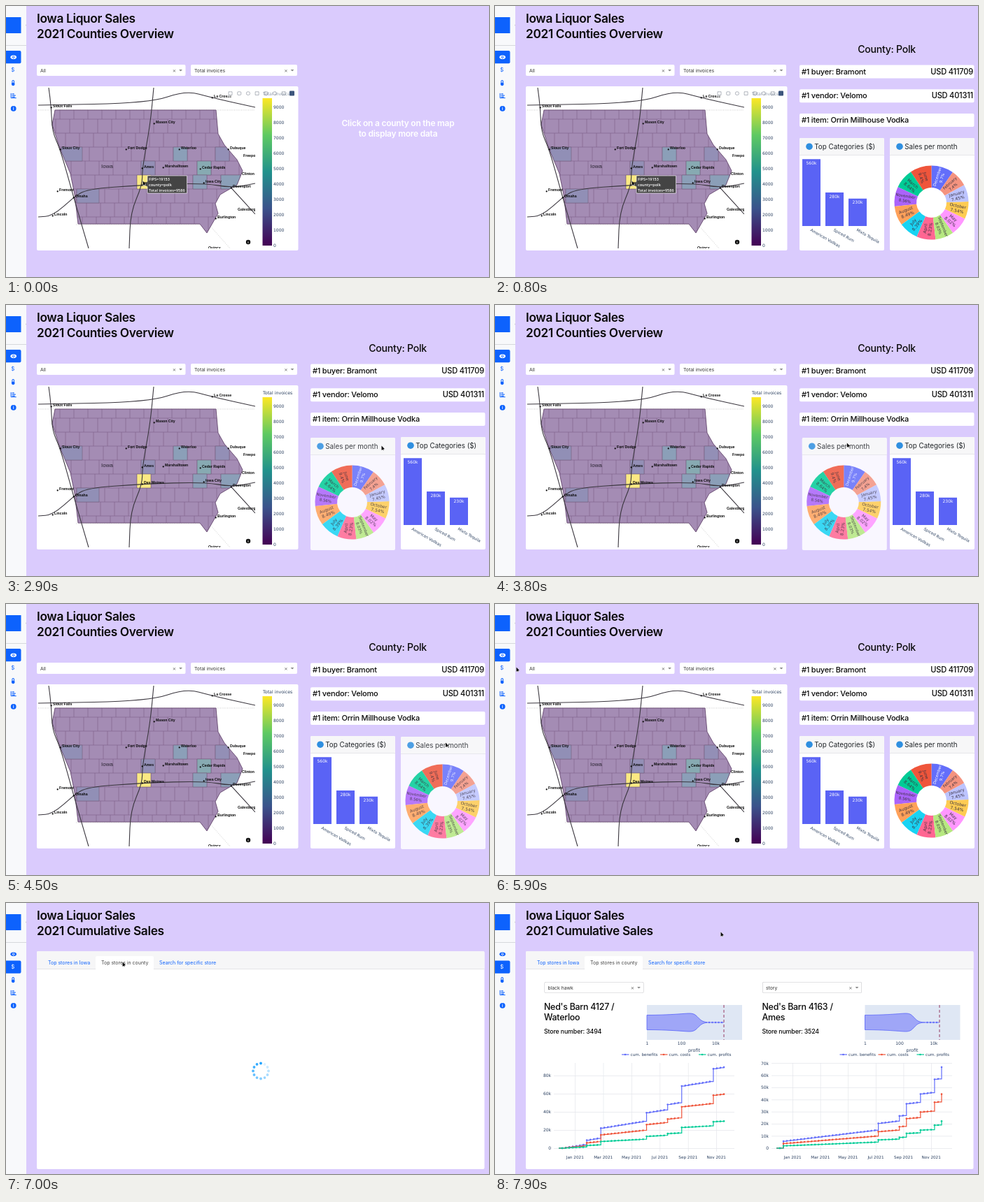
An HTML page with a canvas for the animation above (8 s loop, 690 by 388 pixels).

```html
<!DOCTYPE html>
<html lang="en">
<head>
<meta charset="utf-8">
<title>Liquor sales dashboard</title>
<style>
html, body { margin: 0; width: 100%; height: 100%; overflow: hidden; background: #dacbfd; }
canvas { display: block; width: 690px; height: 388px; }
</style>
</head>
<body>
<canvas id="stage"></canvas>
<script>
const W = 690, H = 388, LOOP = 8000, STEP = 100;
const canvas = document.getElementById('stage');
const ratio = window.devicePixelRatio || 1;
canvas.width = W * ratio;
canvas.height = H * ratio;
const c = canvas.getContext('2d');

const UI = 'Inter, sans-serif', PLOT = '"DejaVu Sans", sans-serif', MAP = '"Liberation Sans", sans-serif';
const LILAC = '#dacbfd', BLUE = '#0d62fd', INK = '#0a0a0a', AXIS = '#2a3f5f', PANEL = '#f8f9fb';
const SERIES = ['#636efa', '#ef553b', '#00cc96'];

const clamp = v => Math.max(0, Math.min(1, v));
const ramp = (t, a, b) => clamp((t - a) / (b - a));
const glide = (t, a, b) => { const v = ramp(t, a, b); return v * v * (3 - 2 * v); };
const mix = (a, b, k) => `rgb(${a.map((v, i) => Math.round(v + (b[i] - v) * k))})`;

function rect(x, y, w, h, color, r = 0) {
  c.fillStyle = color;
  c.beginPath();
  c.roundRect(x, y, w, h, r);
  c.fill();
}
function dot(x, y, r, color) {
  c.fillStyle = color;
  c.beginPath();
  c.arc(x, y, r, 0, 7);
  c.fill();
}
function trace(points) {
  c.beginPath();
  points.forEach(([x, y]) => c.lineTo(x, y));
}
function stroke(color, width) {
  c.strokeStyle = color;
  c.lineWidth = width;
  c.stroke();
}
function line(points, color, width = 1) {
  trace(points);
  stroke(color, width);
}
function polygon(points, color) {
  trace(points);
  c.closePath();
  c.fillStyle = color;
  c.fill();
}
function curve(points, color, width) {
  c.beginPath();
  c.moveTo(...points[0]);
  points.slice(1).forEach(([x, y], i) => {
    const [px, py] = points[i];
    c.quadraticCurveTo(px, py, (px + x) / 2, (py + y) / 2);
  });
  c.lineTo(...points[points.length - 1]);
  stroke(color, width);
}
// y is the middle of the capital letters
function text(s, x, y, size, { color = INK, weight = 400, font = UI, align = 'left' } = {}) {
  c.font = `${weight} ${size}px ${font}`;
  c.letterSpacing = font === UI && weight > 400 ? `${-0.02 * size}px` : '0px';
  c.textAlign = align;
  c.fillStyle = color;
  c.fillText(s, x, y + size * 0.36);
}
function scoped(draw) {
  c.save();
  draw();
  c.restore();
}

// ---------- cursor: each move is start, end, target ----------
const MOVES = [
  [0, 0, 197, 254], [900, 1700, 672, 201], [1950, 2700, 538, 205], [3200, 3600, 500.5, 201],
  [3720, 4500, 629.5, 202], [4700, 5200, 160, 105], [5300, 5900, 32, 94], [5900, 6100, 14, 97],
  [6550, 6900, 168, 88], [7400, 7900, 324, 45]
];
function cursorAt(t) {
  return MOVES.reduce(([x, y], [from, to, tx, ty]) => {
    const k = to ? glide(t, from, to) : 1;
    return [x + (tx - x) * k, y + (ty - y) * k];
  }, [0, 0]);
}
function drawCursor(t) {
  const hand = t >= 6000 && t < 6650;
  c.save();
  c.translate(...cursorAt(t));
  if (hand) {
    rect(-3, -0.5, 7, 5.5, INK, 2);
    rect(-2, -5, 2.4, 7, INK, 1.2);
    rect(-2.2, 0.3, 5.4, 3.9, '#fff', 1.5);
    rect(-1.3, -4.3, 1, 6, '#fff', 0.5);
  } else {
    const arrow = [[-1.5, -3.5], [-1.5, 3], [0, 1.7], [1.4, 3.8], [1.2, 1.3], [3, 1.2]];
    line(arrow, '#fff', 1);
    polygon(arrow, INK);
  }
  c.restore();
}

// ---------- sidebar ----------
const ICONS = [
  (x, y, k) => {
    c.beginPath();
    c.ellipse(x, y, 4.3, 2.8, 0, 0, 7);
    c.fillStyle = k;
    c.fill();
    dot(x, y, 1.7, k === BLUE ? PANEL : BLUE);
    dot(x, y, 0.9, k);
  },
  (x, y, k) => text('$', x - 1, y, 8, { color: k, align: 'center' }),
  (x, y, k) => {
    rect(x - 2.3, y - 4, 3.6, 6, k, 1.8);
    dot(x - 0.5, y + 1.8, 2.4, k);
    rect(x - 1.3, y - 3, 1.6, 3, PANEL, 0.8);
  },
  (x, y, k) => {
    line([[x - 3.5, y - 3.5], [x - 3.5, y + 3.3], [x + 4, y + 3.3]], k, 1);
    [3, 5, 4].forEach((w, i) => rect(x - 2, y - 3.1 + 2.2 * i, w, 1.2, k));
  },
  (x, y, k) => { dot(x, y, 3.9, k); text('i', x, y, 5.5, { color: '#fff', weight: 700, align: 'center' }); }
];
const NAV = ['Counties overview', 'Cumulative sales', 'Profit and Loss', 'Time series', 'Info'];

function drawSidebar(t) {
  const open = glide(t, 6000, 6300) - glide(t, 6600, 6900);
  const width = 29 + 81 * open;
  const active = [1 - ramp(t, 6420, 6620), ramp(t, 6410, 6610), 0, 0, 0];
  const blue = [13, 98, 253], pale = [248, 249, 251], white = [255, 255, 255];
  c.save();
  rect(0, 0, width, H, PANEL);
  c.beginPath();
  c.rect(0, 0, width, H);
  c.clip();
  rect(0, 16, 21.5, 23, BLUE);
  text('Clinky!', 28, 28, 14.5, { weight: 500 });
  rect(0, 56, width - 7 * open, 0.8, '#cdd0d5');
  NAV.forEach((label, i) => {
    const y = 73.2 + 18.4 * i, k = active[i];
    if (k) rect(-4, y - 9.1, 25.5 + 81.5 * open, 18.2, mix(pale, blue, k), 2);
    const color = k ? mix(blue, white, k) : BLUE;
    ICONS[i](10.7, y, color);
    if (open > 0.1) text(label, 18, y, 7, { color });
  });
  c.restore();
  if (open) rect(0, 386.8, 228, 1.2, '#8c8296');
}

// ---------- shared widgets ----------
function heading(second) {
  text('Iowa Liquor Sales', 44, 18, 17.3, { weight: 600 });
  text(second, 44, 40, 17.3, { weight: 600 });
}
function dropdown(x, y, w, value, border = '#fff') {
  rect(x, y, w, 16, border, 2);
  rect(x + 0.6, y + 0.6, w - 1.2, 14.8, '#fff', 1.5);
  text(value, x + 5, y + 8.2, 6.8, { color: '#333' });
  text('×', x + w - 16, y + 8, 8, { color: '#777', align: 'center' });
  const ax = x + w - 7;
  polygon([[ax - 2.4, y + 7], [ax + 2.4, y + 7], [ax, y + 9.6]], '#888');
}

// ---------- map ----------
const TOWNS = {
  'Sioux Falls': [67, 143], 'Mason City': [214, 166], 'Sioux City': [80, 203], 'Fort Dodge': [174, 203],
  'Waterloo': [250, 203], 'Dubuque': [320, 203], 'Ames': [197, 230], 'Marshalltown': [227, 229],
  'Cedar Rapids': [280, 231], 'Des Moines': [197, 254], 'Iowa City': [285, 251], 'Davenport': [324, 258],
  'Fremont': [76, 263], 'Omaha': [99, 272], 'Lincoln': [69, 298], 'Burlington': [302, 302], 'La Crosse': [297, 129],
  'Freeport': [339, 214], 'Clinton': [337, 240], 'Galesburg': [331, 291], 'Quincy': [289, 346]
};
const BORDER = [
  [70, 149], [300, 149], [303, 183], [312, 199], [330, 220], [338, 236], [330, 256], [306, 270], [299, 283],
  [303, 297], [287, 325], [277, 312], [103, 312], [98, 270], [92, 240], [77, 204], [66, 170]
];
// roads run through towns, or through free points
const ROADS = [
  [[211, 117], [206, 170], 'Ames', 'Des Moines', [178, 295], [176, 347]],
  ['Omaha', [115, 262], 'Des Moines', 'Iowa City', 'Davenport', [356, 254]],
  [[61, 117], 'Sioux Falls', [66, 180], 'Sioux City', 'Omaha', [118, 347]],
  [[46, 142], [205, 139], [257, 121], 'La Crosse', [356, 145]],
  [[46, 302], 'Lincoln', 'Omaha'],
  ['Davenport', [356, 298]]
];
// counties as column, row and width on a sheared grid whose origin is Polk
const CELL = 20, SHEAR = 6;
const cellAt = (col, row) => [187 + col * CELL - row * SHEAR, 242 + row * CELL];
const COUNTIES = [
  [-6, -2, 1.5, '#918fb6'], [2, -2, 1, '#8b9fb8'], [5, -2, 1, '#938fb6'], [0, -1, 1, '#938fb6'],
  [4, -1, 1, '#87aab2'], [-4, 1, 1.6, '#918fb6'], [4, 0, 1, '#8b9fb8'], [6, 0, 1.4, '#8b9fb8'], [0, 0, 1, '#fbe983']
];
const townDot = name => [TOWNS[name][0] - 2.3, TOWNS[name][1] + 2.4];

function drawCounties() {
  polygon(BORDER, '#a48cb4');
  c.clip();
  for (let row = -5; row < 5; row++) {
    const [, y] = cellAt(0, row);
    line([[60, y], [345, y]], '#7c6189', 0.6);
    for (let col = -9; col < 10; col++) {
      const [x] = cellAt(col, row);
      line([[x, y], [x, y + CELL]], '#7c6189', 0.6);
    }
  }
  COUNTIES.forEach(([col, row, span, color]) => {
    const [x, y] = cellAt(col, row);
    rect(x, y, CELL * span, CELL, color);
    stroke('#75617f', 0.6);
  });
}
function drawMap() {
  c.save();
  c.beginPath();
  c.rect(46, 117, 310, 230);
  c.clip();
  scoped(() => {
    c.setLineDash([1, 1.5]);
    line([[46, 149], [356, 149]], '#aaa', 0.6);
    line([[100, 313], [290, 313], [320, 347]], '#aaa', 0.6);
  });
  scoped(drawCounties);
  line([...BORDER, BORDER[0]], '#65476f', 0.9);
  ROADS.forEach(road => curve(road.map(p => TOWNS[p] ? townDot(p) : p), '#3a363e', 1.1));
  Object.entries(TOWNS).forEach(([name, [x, y]]) => {
    text(name, x, y, 5.2, { font: MAP, weight: 700 });
    if (x < 330) dot(...townDot(name), 1.1, INK);
  });
  text('Iowa', 136, 229.5, 8, { font: MAP, color: '#2b2433' });
  c.restore();
  dot(346, 338, 3.2, INK);
  text('i', 346, 338, 5, { color: '#fff', weight: 700, align: 'center' });
}
function drawColorbar() {
  const g = c.createLinearGradient(0, 343, 0, 132);
  ['#440154', '#3b528b', '#21918c', '#5ec962', '#fde725'].forEach((k, i) => g.addColorStop(i / 4, k));
  rect(366.5, 132, 13.5, 211, g);
  for (let i = 0; i < 10; i++) text(`${i * 1000}`, 382, 343 - i * 22.05, 6, { font: PLOT, color: AXIS });
  text('Total invoices', 367, 126, 6.3, { font: PLOT, color: AXIS });
}
function drawModebar() {
  scoped(() => {
    c.globalAlpha = 0.5;
    rect(316, 121, 98, 9, '#fff');
    for (let i = 0; i < 7; i++) {
      c.beginPath();
      c.roundRect(318 + i * 12.7, 122.8, 5, 4.6, i % 3);
      stroke('#555e70', 0.9);
    }
  });
  rect(405, 121.5, 7, 7, '#3d557c', 1);
}
function drawTooltip() {
  rect(202, 243, 56.5, 25, '#444');
  stroke('#fff', 0.6);
  polygon([[197, 255], [202.5, 251], [202.5, 259]], '#444');
  ['FIPS=19153', 'county=polk', 'Total invoices=9586'].forEach((s, i) =>
    text(s, 204, 248 + i * 7.8, 5.5, { font: '"Open Sans", sans-serif', weight: 600, color: '#fff' }));
}

// ---------- county cards ----------
const BARS = [['American Vodkas', 560], ['Spiced Rum', 280], ['Mixto Tequila', 230]];
// listed counterclockwise from twelve o'clock, except the first, which lies clockwise of it
const MONTHS = [
  ['December', 9.7, '#636efa'], ['June', 9.4, '#ef553b'], ['March', 8.64, '#00cc96'], ['November', 8.56, '#ab63fa'],
  ['August', 8.49, '#ffa15a'], ['July', 8.39, '#19d3f3'], ['April', 8.23, '#ff6692'], ['September', 8.03, '#b6e880'],
  ['May', 8.02, '#ff97ff'], ['October', 7.54, '#fecb52'], ['January', 7.45, '#bdc4ff'], ['February', 7.4, '#f4937f']
];
function cardFrame(title) {
  rect(0, 0, 121, 161, '#fff', 2);
  rect(0, 0, 121, 24, '#f7f7f8', 2);
  rect(0, 24, 121, 0.7, '#dedee2');
  dot(14, 12.2, 4.8, '#2f8fe0');
  text(title, 21.3, 12.2, 9.8, { color: '#212529' });
}
function barCard() {
  cardFrame('Top Categories ($)');
  BARS.forEach(([name, value], i) => {
    const x = 4 + i * 33, h = value * 0.171;
    rect(x, 126 - h, 26, h, '#5a63f5');
    text(`${value}k`, x + 13, 131.3 - h, 6, { font: PLOT, color: '#fff', align: 'center' });
    scoped(() => {
      c.translate(x + 12, 131);
      c.rotate(Math.PI / 6);
      text(name, 0, 0, 5.6, { font: PLOT, color: AXIS });
    });
  });
}
function pieCard() {
  cardFrame('Sales per month');
  c.translate(59.5, 92.5);
  const total = MONTHS.reduce((sum, m) => sum + m[1], 0);
  let angle = -Math.PI / 2;
  MONTHS.forEach(([name, share, color], i) => {
    const sweep = share / total * Math.PI * 2;
    if (i) angle -= sweep;
    const from = angle, mid = from + sweep / 2;
    c.beginPath();
    c.arc(0, 0, 53, from, from + sweep);
    c.arc(0, 0, 21.5, from + sweep, from, true);
    c.fillStyle = color;
    c.fill();
    scoped(() => {
      c.rotate(mid);
      c.translate(38, 0);
      if (Math.cos(mid) < 0) c.rotate(Math.PI);
      const style = { font: PLOT, color: i ? '#3b3340' : '#fff', align: 'center' };
      const size = name.length > 7 ? 5.5 : 6;
      text(name, 0, -3.3, size, style);
      text(`${share}%`, 0, 3.7, size, style);
    });
  });
}
function drawCards(t) {
  const LEFT = 435, GAP = 129, TOP = 189;
  const place = (draw, slot, lift) => scoped(() => {
    c.globalAlpha = 1 - 0.15 * lift;
    c.translate(LEFT + GAP * slot, TOP + lift);
    draw();
  });
  const held = (t >= 1950 && t < 3000) || (t >= 3720 && t < 4700);
  place(barCard, glide(t, 2300, 2550) - glide(t, 4150, 4400), 0);
  place(pieCard, 1 - glide(t, 1950, 2700) + glide(t, 3720, 4500), held ? 1 : 0);
}

// ---------- pages ----------
function countiesPage(t) {
  heading('2021 Counties Overview');
  dropdown(44, 84, 212.5, 'All');
  dropdown(264, 84, 152, 'Total invoices');
  rect(44, 115, 373.5, 235, '#fff', 2);
  drawMap();
  drawColorbar();
  if (t < 1300) drawModebar();
  if (t < 1000) drawTooltip();
  if (t < 500) {
    ['Click on a county on the map', 'to display more data'].forEach((s, i) =>
      text(s, 560, 167.5 + i * 15.5, 12, { color: '#fff', weight: 600, align: 'center' }));
    return;
  }
  text('County: Polk', 559.5, 61.5, 14.1, { weight: 500, align: 'center' });
  [['#1 buyer: Bramont', 'USD 411709'], ['#1 vendor: Velomo', 'USD 401311'], ['#1 item: Orrin Millhouse Vodka', '']]
    .forEach(([label, amount], i) => {
      const y = 84.5 + i * 34.7;
      rect(435, y, 249.5, 19, '#fff', 2);
      text(label, 438, y + 9.3, 11, { weight: 500 });
      text(amount, 683, y + 9.3, 11.1, { weight: 500, align: 'right' });
    });
  drawCards(t);
}

// sales grow steadily, with jumps given as [share of the year, share of the total]
const STORES = [
  {
    x: 70, county: 'black hawk', name: "Ned's Barn 4127 /", town: 'Waterloo', id: 3494, fall: 73, cut: 257,
    axis: 80, start: 96, top: 80, tick: 20, unit: 1.3, month: 40.4,
    jumps: [[0.14, 0.05], [0.23, 0.12], [0.52, 0.1], [0.64, 0.06], [0.72, 0.2], [0.92, 0.15]]
  },
  {
    x: 381.5, county: 'story', name: "Ned's Barn 4163 /", town: 'Ames', id: 3524, fall: 70, cut: 253.5,
    axis: 391, start: 407, top: 70, tick: 10, unit: 1.738, month: 39.6,
    jumps: [[0.01, 0.08], [0.6, 0.08], [0.72, 0.06], [0.78, 0.14], [0.85, 0.1], [0.95, 0.16], [0.98, 0.14]]
  }
];
function growth(jumps, u) {
  const sum = list => list.reduce((total, j) => total + j[1], 0);
  return (1 - sum(jumps)) * u + sum(jumps.filter(j => j[0] <= u));
}
function drawViolin(s) {
  const x = s.x + 147, mid = 171, cut = s.x + s.cut;
  rect(x, 146, 136, 50, '#dfe7f4');
  const half = dx => {
    const u = dx / s.fall;
    return (10.5 + 4 * u * u) / (1 + Math.exp(22 * (u - 1)));
  };
  const upper = Array.from({ length: 44 }, (_, i) => [x + 2 * i, mid - half(2 * i)]);
  const lower = upper.map(([px, py]) => [px, 2 * mid - py]).reverse();
  polygon([...upper, ...lower], '#9fa6f7');
  stroke(SERIES[0], 0.9);
  line([[x + 86, mid], [cut, mid]], SERIES[0], 0.9);
  for (let px = x + 89; px <= cut; px += 4.5) dot(px, mid, 1.2, SERIES[0]);
  scoped(() => {
    c.setLineDash([4, 3]);
    line([[cut, 146], [cut, 196]], '#963a62', 1);
  });
  const style = { font: PLOT, color: AXIS, align: 'center' };
  ['1', '100', '10k'].forEach((label, i) => text(label, x + 0.5 + i * 49, 201, 6, style));
  text('profit', x + 67.5, 211, 6.4, style);
}
function drawLines(s) {
  const style = { font: PLOT, color: AXIS }, base = 351, height = 116, span = 231, parts = 46;
  ['cum. benefits', 'cum. costs', 'cum. profits'].forEach((label, i) => {
    const x = s.x + 111 + 55 * i;
    line([[x, 217], [x + 10.5, 217]], SERIES[i], 1.2);
    dot(x + 5, 217, 1.3, SERIES[i]);
    text(label, x + 12.5, 217, 5.7, style);
  });
  for (let v = 0; v <= s.top; v += s.tick) {
    const y = base - v * s.unit;
    rect(s.axis + 4, y, 258, 0.7, '#e4e6eb');
    text(v ? `${v}k` : '0', s.axis, y, 6, { ...style, align: 'right' });
  }
  ['Jan', 'Mar', 'May', 'Jul', 'Sep', 'Nov'].forEach((month, i) => {
    const x = s.start + 15 + (i + 0.08) * s.month;
    rect(x, 229, 0.7, 127, '#e4e6eb');
    text(`${month} 2021`, x, 364, 5.7, { ...style, align: 'center' });
  });
  [1, 2 / 3, 1 / 3].forEach((share, n) => {
    let lastY = base;
    for (let i = 0; i <= parts; i++) {
      const x = s.start + span * i / parts;
      const y = base - height * share * growth(s.jumps, i / parts);
      line([[x - span / parts, lastY], [x, lastY], [x, y]], SERIES[n], 1.2);
      dot(x, y, 1.3, SERIES[n]);
      lastY = y;
    }
  });
}
function drawSpinner(t) {
  for (let i = 0; i < 12; i++) {
    const a = i / 12 * Math.PI * 2;
    c.globalAlpha = 0.15 + 0.85 * ((i / 12 - t / 1200 + 8) % 1);
    dot(364 + 11 * Math.cos(a), 240.5 + 11 * Math.sin(a), 1.9, '#119dff');
  }
  c.globalAlpha = 1;
}
function salesPage(t) {
  heading('2021 Cumulative Sales');
  const wide = t >= 6700, active = t >= 7000 ? 1 : 0;
  const width = wide ? 639.5 : 268.5;
  rect(44, 69, width, wide ? 312 : 40, '#fff', 2);
  rect(44, 69, width, 25.5, '#f6f6f7', 2);
  rect(44, 94, width, 0.7, '#dcdce0');
  rect(active ? 128 : 52, 76, active ? 83 : 76, 20, '#fff', 2);
  [['Top stores in Iowa', 60], ['Top stores in county', 136], ['Search for specific store', 219]].forEach(([s, x], i) =>
    text(s, x, 85, 7, { color: i === active ? '#444' : BLUE }));
  if (!wide) return;
  if (t < 7500) return drawSpinner(t);
  STORES.forEach(s => {
    dropdown(s.x + 0.5, 113, 142, s.county, '#c8c8cc');
    text(s.name, s.x, 148.3, 12.4, { weight: 500 });
    text(s.town, s.x, 163.8, 12.4, { weight: 500 });
    text(`Store number: ${s.id}`, s.x, 184, 8.9, { weight: 500 });
    drawViolin(s);
    drawLines(s);
  });
}

function frame(now) {
  const t = Math.floor(now % LOOP / STEP) * STEP;
  c.setTransform(ratio, 0, 0, ratio, 0, 0);
  rect(0, 0, W, H, LILAC);
  (t < 6400 ? countiesPage : salesPage)(t);
  drawSidebar(t);
  drawCursor(t);
  requestAnimationFrame(frame);
}
requestAnimationFrame(frame);
</script>
</body>
</html>
```
